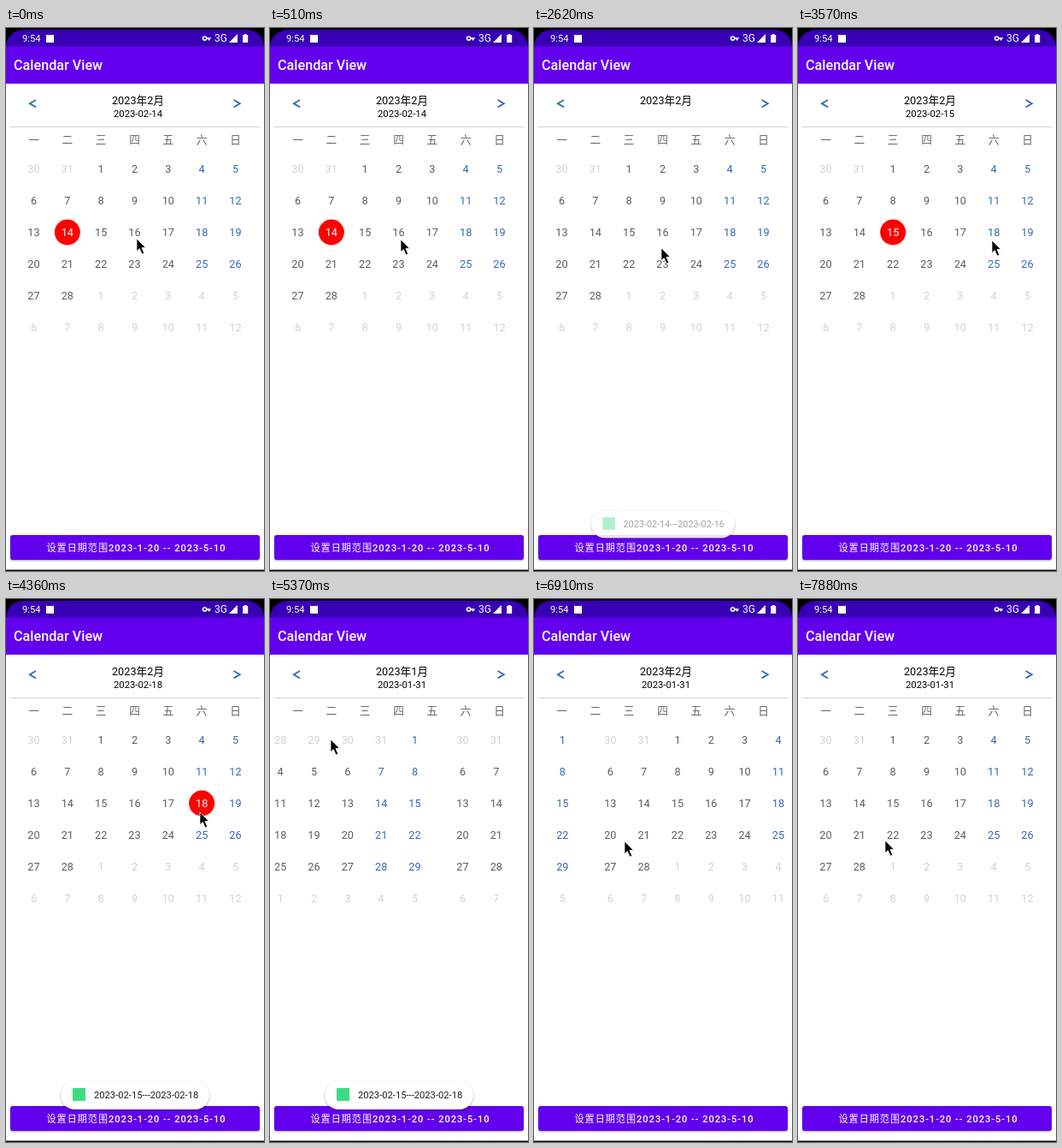
These frames come from a looping animation (302x634 px, 8 s). An HTML page:

```html
<!DOCTYPE html>
<html lang="zh-CN">
<head>
<meta charset="utf-8">
<title>Calendar View</title>
<style>
  html, body { margin: 0; width: 100%; height: 100%; overflow: hidden; background: #fff; }
  svg { display: block; width: 100%; height: 100%; }
  text { font: 12.7px Roboto, "Noto Sans CJK SC", "Noto Sans CJK", sans-serif; }
  .mid { text-anchor: middle; }
  .white { fill: #fff; }
  .soft { filter: drop-shadow(0 1px 1.2px rgba(0, 0, 0, .35)); }
</style>
</head>
<body>
<svg viewBox="0 0 302 634">
  <defs>
    <clipPath id="pager"><rect x="5" y="140" width="292" height="240"/></clipPath>
  </defs>
  <rect width="302" height="634" fill="#fff"/>

  <!-- status bar -->
  <rect width="302" height="24" fill="#000"/>
  <path d="M0 24V22A21 20 0 0 1 21 2H281A21 20 0 0 1 302 22V24Z" fill="#3700b3"/>
  <g class="white">
    <text x="19" y="16" style="font-size:11.2px">9:54</text>
    <rect x="47" y="8" width="9" height="9"/>
    <path d="M235 11.2H239.6V13H238.6V14.6H236.8V13H235Z"/>
    <circle cx="232.6" cy="12.1" r="2.2" fill="none" stroke="#fff" stroke-width="1.5"/>
    <text x="244" y="16.3" style="font-size:12px">3G</text>
    <path d="M271 7V17H261Z"/>
    <path d="M277.2 8H279V7H281.4V8H283.2V17H277.2Z"/>
  </g>

  <!-- app bar -->
  <rect y="21.5" width="302" height="43.5" fill="#6200ee"/>
  <text class="white" x="9" y="49" style="font-size:16.2px;font-weight:500">Calendar View</text>

  <!-- month header -->
  <g fill="none" stroke="#3468b8" stroke-width="1.8">
    <path d="M35 84L27.8 88.2L35 92.4"/>
    <path d="M266.6 84L273.8 88.2L266.6 92.4"/>
  </g>
  <text id="title" class="mid" x="154.5" y="88.5"></text>
  <text id="date" class="mid" x="154.5" y="104" style="font-size:11.3px"></text>
  <rect x="5" y="115" width="292" height="1" fill="#d6d6d6"/>
  <g id="week" fill="#666"></g>
  <g clip-path="url(#pager)"><g id="pages"></g></g>

  <!-- button -->
  <rect class="soft" x="5" y="592" width="292" height="29" rx="3" fill="#6200ee"/>
  <text class="mid white" x="152.5" y="611"
    style="font-size:11.1px;font-weight:500;letter-spacing:.0893em">设置日期范围2023-1-20 -- 2023-5-10</text>
  <rect y="632.5" width="302" height="1.5" fill="#111"/>

  <g id="toast">
    <rect id="pill" class="soft" x="64" y="563" width="174" height="33" rx="16.5" fill="#fff"/>
    <g id="note">
      <rect x="78" y="571" width="15" height="15" fill="#3ddc84"/>
      <text id="range" x="103" y="583" fill="#1c1c1c" style="font-size:11.2px"></text>
    </g>
  </g>

  <path id="cursor" d="M0 0V14.6L3.3 11.5L6.2 18L8.7 16.9L5.9 10.6L10.3 10.3Z"
    stroke="#fff" stroke-width=".7"/>
</svg>
<script>
const LOOP = 8000, PAGE = 292, DAY = 864e5;
const NS = 'http://www.w3.org/2000/svg';
const $ = id => document.getElementById(id);

function add(parent, tag, attrs, text = '') {
  const el = document.createElementNS(NS, tag);
  for (const key in attrs) el.setAttribute(key, attrs[key]);
  el.textContent = text;
  return parent.appendChild(el);
}

const colX = c => 32.5 + c * 39.33;
const rowY = r => 164.5 + r * 37;

[...'一二三四五六日'].forEach((name, c) =>
  add($('week'), 'text', { class: 'mid', x: colX(c), y: 135.2 }, name));

// One six-week page; weeks start on Monday.
function makePage(month) {
  const g = add($('pages'), 'g', {});
  const mark = add(g, 'circle', { r: 15, fill: '#f00' });
  const first = Date.UTC(2023, month - 1, 1);
  const lead = (new Date(first).getUTCDay() + 6) % 7;
  const cells = [];
  for (let i = 0; i < 42; i++) {
    const day = new Date(first + (i - lead) * DAY);
    const own = day.getUTCMonth() === month - 1;
    const fill = !own ? '#d2d2d2' : i % 7 > 4 ? '#3468b8' : '#5c5c5c';
    const x = colX(i % 7), y = rowY(Math.floor(i / 7));
    const el = add(g, 'text', { class: 'mid', x, y: y + 4.5 }, day.getUTCDate());
    cells.push({ el, x, y, fill, key: own ? day.toISOString().slice(5, 10) : null });
  }
  return { g, mark, cells };
}
const jan = makePage(1), feb = makePage(2);

function select(page, key) {
  page.mark.style.display = 'none';
  for (const cell of page.cells) {
    const on = cell.key === key;
    cell.el.setAttribute('fill', on ? '#fff' : cell.fill);
    if (!on) continue;
    page.mark.style.display = '';
    page.mark.setAttribute('cx', cell.x);
    page.mark.setAttribute('cy', cell.y);
  }
}

// [start of span, screen updates within it]
const SPANS = [[0, 1], [120, 7], [1150, 1], [1300, 7], [2230, 1], [2380, 2], [2620, 1],
  [2770, 4], [3330, 1], [3450, 1], [3570, 1], [3690, 6], [4480, 1], [4620, 6], [5370, 1],
  [5520, 1], [5670, 6], [6480, 1], [6610, 1], [6760, 7], [7740, 1], [7880, 1], [LOOP, 1]];

function snap(t) {
  const i = SPANS.findIndex(s => s[0] > t) - 1;
  const [start, n] = SPANS[i], step = (SPANS[i + 1][0] - start) / n;
  return start + Math.floor((t - start) / step) * step;
}

const PICKS = [[0, '02-14'], [550, '02-16'], [2500, ''], [3040, '02-15'],
  [3690, '02-18'], [5300, '01-31']];
const TOASTS = [[550, 2500, '02-14', '02-16'], [3690, 5670, '02-15', '02-18']];
const SCROLL = [[0, 0], [5245, 0], [5370, 193], [5520, 277], [5670, 292], [6480, 292],
  [6610, 217], [6760, 150], [6890, 60], [7040, 12], [7180, 0]];
const POINTER = [[0, 153, 246], [1150, 153, 249], [1560, 141, 262], [1830, 136, 248],
  [2230, 149, 255], [2620, 149, 257], [2960, 112, 246], [3190, 113, 246], [3570, 227, 248],
  [4480, 227, 249], [5120, 71, 164], [5520, 71, 164], [5940, 95, 212], [6340, 216, 297],
  [6480, 219, 298], [6610, 140, 288], [6760, 106, 283], [7740, 106, 283], [7880, 102, 282]];

const clamp = v => Math.max(0, Math.min(1, v));

function track(keys, t, ease = u => u) {
  let i = keys.findIndex(k => k[0] > t);
  if (i < 0) return keys[keys.length - 1].slice(1);
  const a = keys[i - 1], b = keys[i];
  const u = ease((t - a[0]) / (b[0] - a[0]));
  return a.slice(1).map((v, k) => v + (b[k + 1] - v) * u);
}

function drawToast(t) {
  const item = TOASTS.find(([from, to]) => t >= from && t < to + 200);
  $('toast').style.display = item ? '' : 'none';
  if (!item) return;
  const [from, to, a, b] = item;
  const show = Math.min(clamp((t - from + 60) / 200), clamp(1 - (t - to) / 200));
  const scale = 1 - .055 * (1 - show);
  $('range').textContent = `2023-${a}---2023-${b}`;
  $('note').setAttribute('opacity', show);
  $('pill').setAttribute('opacity', Math.min(1, show * 2.2));
  $('toast').setAttribute('transform',
    `translate(151 579.5) scale(${scale}) translate(-151 -579.5)`);
}

let last = -1;
function draw(t) {
  if (t === last) return;
  last = t;
  const pick = PICKS.filter(p => p[0] <= t).pop()[1];
  const [x] = track(SCROLL, t);
  $('title').textContent = `2023年${x > PAGE / 2 ? 1 : 2}月`;
  $('date').textContent = pick && '2023-' + pick;
  select(jan, pick);
  select(feb, pick);
  feb.g.setAttribute('transform', `translate(${x})`);
  jan.g.setAttribute('transform', `translate(${x - PAGE})`);
  // Cells cross-fade briefly when a range is completed.
  const fading = TOASTS.some(([from]) => t >= from && t < from + 110);
  $('pages').setAttribute('opacity', fading ? .8 : 1);
  drawToast(t);
  const [cx, cy] = track(POINTER, t, u => u * u * (3 - 2 * u));
  $('cursor').setAttribute('transform', `translate(${cx} ${cy})`);
}

const begin = performance.now();
function tick() {
  draw(snap((performance.now() - begin) % LOOP));
  requestAnimationFrame(tick);
}
tick();
</script>
</body>
</html>
```
